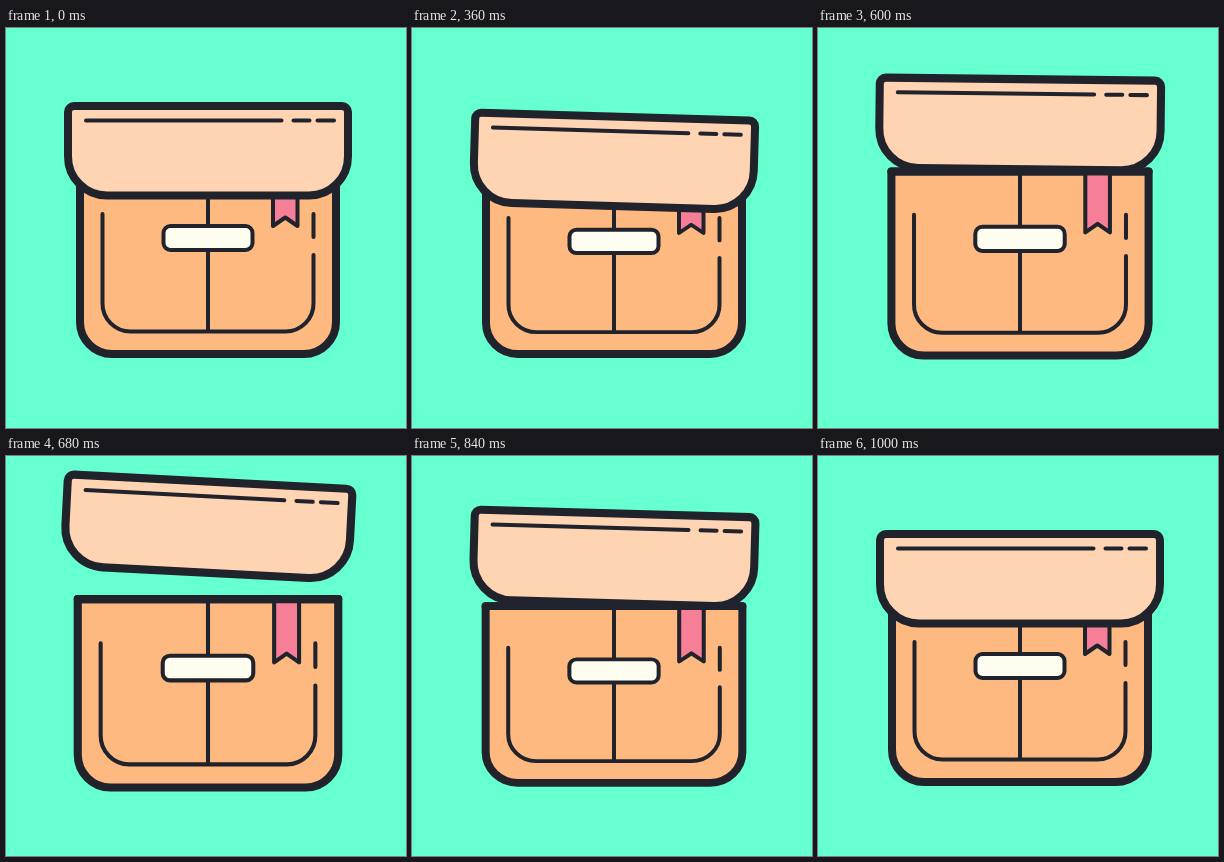
Write an HTML page that moves like this. It is 400 px wide and 400 px high and loops after 1.12 s.

```html
<!DOCTYPE html>
<html lang="en">
<head>
<meta charset="utf-8">
<title>Box opening</title>
<style>
  html, body { margin: 0; height: 100%; overflow: hidden; background: #66ffcf; }
  svg { display: block; width: 100%; height: 100%; }
  g { stroke: #20222c; stroke-linecap: round; stroke-linejoin: round; }
  .thick { stroke-width: 8; }
  .thin { stroke-width: 4; }
</style>
</head>
<body>
<svg viewBox="0 0 400 400">
  <g id="body">
    <path class="thick" fill="#fdb97f" d="M74 143H330V294a32 32 0 0 1-32 32H106a32 32 0 0 1-32-32Z"/>
    <path class="thin" fill="none" d="M202 143V303M96.5 186V275a28 28 0 0 0 28 28.500H279.500a28 28 0 0 0 28-28.500V227M307.500 186V209"/>
    <path id="ribbon" class="thin" fill="#f77e97"/>
    <rect class="thin" fill="#fffdf0" x="157.500" y="198" width="89" height="24" rx="7"/>
    <path class="thick" fill="none" d="M74 143H330"/>
  </g>
  <g id="lid">
    <path class="thick" fill="#fed4b2" d="M68 78H336a6 6 0 0 1 6 6V128a39 39 0 0 1-39 39.500H101a39 39 0 0 1-39-39.500V84a6 6 0 0 1 6-6Z"/>
    <path class="thin" fill="none" d="M80 92.500H275.500M287.500 92.500H303.500M311.500 92.500H328"/>
  </g>
</svg>
<script>
const LOOP = 1120, STEP = 40;
const [body, ribbon, lid] = ["body", "ribbon", "lid"].map(id => document.getElementById(id));

const easeOut = u => Math.sin(u * Math.PI / 2);
const smooth = u => u * u * (3 - 2 * u);
const gravity = u => u * u;
const progress = (t, from, to) => Math.min(1, Math.max(0, (t - from) / (to - from)));

// shift and tilt move the lid, height scales the body, slide lengthens the ribbon
const rest = { shift: 0, tilt: 0, height: 1, slide: 0 };
const crouch = { shift: 12.4, tilt: -3, height: 0.966, slide: 4 };
const peak = { shift: -52, tilt: 3, height: 1.03, slide: 6.5 };
const landing = { shift: 4, tilt: 0.5, height: 0.915, slide: -1 };

const phases = [
  { from: 140, to: 480, ease: easeOut, pose: crouch },
  { from: 480, to: 690, ease: smooth, pose: peak },
  { from: 720, to: 880, ease: gravity, pose: landing },
  { from: 880, to: 1000, ease: smooth, pose: rest }
];

function poseAt(t) {
  const now = { ...rest };
  for (const { from, to, ease, pose } of phases) {
    const u = ease(progress(t, from, to));
    for (const key in now) now[key] += (pose[key] - now[key]) * u;
  }
  now.tilt += 4.7 * Math.sin(Math.PI * progress(t, 140, 480)); // wobble while crouching
  return now;
}

function draw(time) {
  const { shift, tilt, height, slide } = poseAt(Math.floor(time % LOOP / STEP) * STEP);
  const drop = (Math.min(0, shift) / 22) ** 2; // recoil of the body under a flying lid
  const wide = 1 + drop * 0.0032;
  body.setAttribute("transform",
    `translate(202 ${326 + drop}) scale(${wide} ${height}) translate(-202 -326)`);
  ribbon.setAttribute("d", `M267 143H291.500V${198 + slide}l-12.250-8.500l-12.250 8.500Z`);
  lid.setAttribute("transform",
    `translate(202 ${122.5 + shift}) rotate(${tilt}) scale(${wide}) translate(-202 -122.500)`);
}

const start = performance.now();
function tick() {
  draw(performance.now() - start);
  requestAnimationFrame(tick);
}
tick();
</script>
</body>
</html>
```
